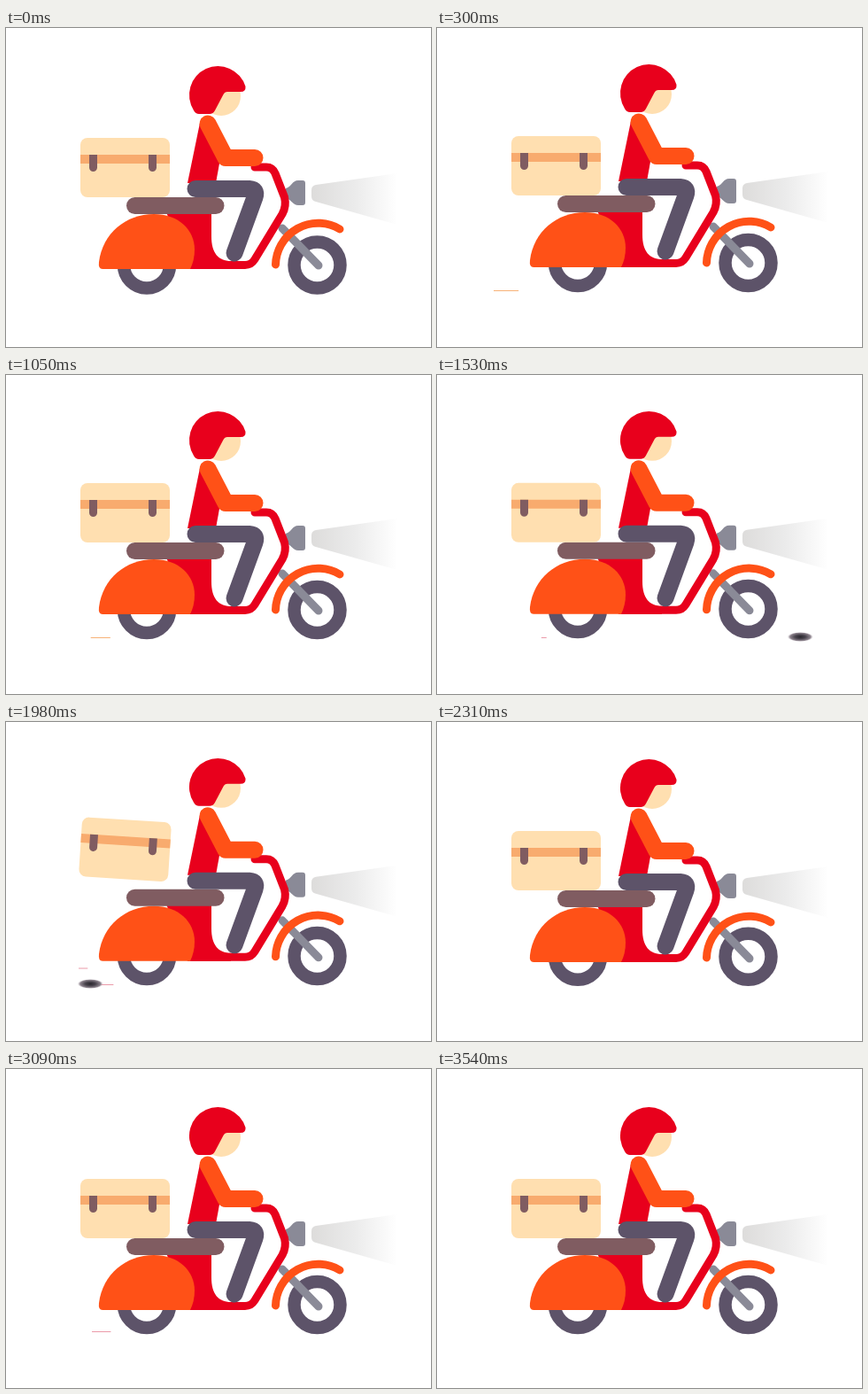
An HTML page for the animation above (3.57 s loop, 480 by 360 pixels).

```html
<!DOCTYPE html>
<html lang="en">
<head>
<meta charset="utf-8">
<title>Delivery scooter</title>
<style>
  html, body { margin: 0; width: 100%; height: 100%; overflow: hidden; background: #fff; }
  svg { display: block; width: 480px; height: 360px; }
  .red { fill: #e8001c; }
  .orange { fill: #ff5117; }
  .slate { fill: #5d5369; }
  .brown { fill: #805c61; }
  .skin { fill: #ffdfb0; }
  .tube { fill: none; stroke-linecap: round; stroke-linejoin: round; }
</style>
</head>
<body>
<svg viewBox="0 0 480 360">
  <defs>
    <linearGradient id="light">
      <stop stop-color="#dddcdb"/>
      <stop offset=".5" stop-color="#ebebeb"/>
      <stop offset="1" stop-color="#fff"/>
    </linearGradient>
    <radialGradient id="pebble">
      <stop stop-color="#29262d"/>
      <stop offset=".4" stop-color="#48434c"/>
      <stop offset=".8" stop-color="#8d838d"/>
      <stop offset="1" stop-color="#c4bcc4" stop-opacity="0"/>
    </radialGradient>
    <g id="wheel">
      <circle r="26" fill="#fff" stroke="#5d5369" stroke-width="14.5"/>
    </g>
  </defs>

  <g id="lines" stroke-width="1"></g>
  <ellipse id="stone" cy="295.5" rx="14.5" ry="5.5" fill="url(#pebble)"/>

  <g id="bike">
    <g id="wheels">
      <use href="#wheel" x="159"/>
      <use href="#wheel" x="351.5"/>
    </g>
    <g id="body">
      <path fill="url(#light)" d="M350 177L442 164V222L350 196Q345 195 345 190V183Q345 178 350 177"/>
      <path fill="#8a8a97" d="M335 172Q338 172 338 175V197Q338 200 335 200H330C324 200 323 194 316 192V181C323 179 323 172 330 172Z"/>
      <path class="tube" stroke="#8a8a97" stroke-width="9" d="M312 226L353 268"/>
      <path class="tube" stroke="#ff5117" stroke-width="9" d="M304.5 267A48 48 0 0 1 377 227"/>
      <path class="red" d="M180 205H232V235C232 254 240 263 254 263V272H205Z"/>
      <path class="tube" stroke="#e8001c" stroke-width="9" d="M281 157H294Q301 157 304 164L314.500 191Q317 201 312 210L281 261Q277 267.500 270 267.500H210"/>
      <path class="orange" d="M109 272Q104 272 105 264C109 232 135 210 167 210C195 210 213 228 213 250Q213 262 208 272Z"/>
      <rect class="brown" x="136" y="191" width="110.500" height="19" rx="9.500"/>
      <path class="red" d="M219 107L241 145V153L237 175H205Z"/>
      <path class="tube" stroke="#5d5369" stroke-width="19" d="M214 181.500H275Q284 182 281 191L258 254"/>
      <path class="tube" stroke="#ff5117" stroke-width="19" d="M228 108L248 146.500H281"/>
      <circle class="skin" cx="243" cy="77" r="22"/>
      <path class="red" d="M212 93A32.500 32.500 0 1 1 270.500 66Q271 72 265 72H250Q247 72 245.500 75L236 93Q234 97 230 97H218Q214 97 212 93"/>
      <g id="parcel">
        <rect class="skin" x="84" y="124" width="101" height="67" rx="8"/>
        <path fill="#f8ab6e" d="M84 143H185V153H84Z"/>
        <path class="brown" d="M94 143h9v14.500a4.500 4.500 0 0 1-9 0ZM161 143h9v14.500a4.500 4.500 0 0 1-9 0Z"/>
      </g>
    </g>
  </g>
</svg>
<script>
const LOOP = 3570, STEP = 30;
const ORANGE = '#f7b277', PINK = '#eb9aa9';
const bodyBob = [-2, -2.2, -1, 0, 0];
const wheelY = [265, 264, 264.8, 266, 267.5];

// start time, colour, right end, height
const streaks = [
  [60, ORANGE], [383, ORANGE], [945, ORANGE], [1508, PINK],
  [1680, PINK, 142, 278], [1900, PINK, 125], [2449, PINK], [2990, PINK]
].map(([start, color, x = 124, y = 296.5]) => {
  const line = document.createElementNS('http://www.w3.org/2000/svg', 'line');
  line.setAttribute('stroke', color);
  line.setAttribute('y1', y);
  line.setAttribute('y2', y);
  lines.append(line);
  return { line, start, x };
});

const move = (el, value) => el.setAttribute('transform', value);
const pulse = (t, from, to) =>
  t > from && t < to ? Math.sin(Math.PI * (t - from) / (to - from)) : 0;

function draw(t) {
  const frame = Math.floor(t / STEP) || LOOP / STEP;
  const phase = frame % 5;
  move(body, `translate(0 ${bodyBob[phase]})`);
  move(wheels, `translate(0 ${wheelY[phase]})`);

  // The front lifts over the stone, then the parcel is tossed
  move(bike, `rotate(${-6 * pulse(t, 1590, 1830)} 185 182)`);
  const toss = pulse(t, 1830, 2130);
  move(parcel, `translate(0 ${-11.5 * toss}) rotate(${3.7 * toss} 134.5 157.5)`);

  stone.setAttribute('cx', 411 - (t - 1530) * 0.7);
  stone.style.display = t > 1400 && t < 2050 ? '' : 'none';

  for (const { line, start, x } of streaks) {
    const run = (t - start) * 0.267;
    const tail = run * run / 130;
    line.style.display = run > 0 && tail < 60 ? '' : 'none';
    line.setAttribute('x1', x - Math.min(run, 60));
    line.setAttribute('x2', x - tail);
  }
}

function tick() {
  draw(performance.now() % LOOP);
  requestAnimationFrame(tick);
}
draw(0);
requestAnimationFrame(tick);
</script>
</body>
</html>
```
